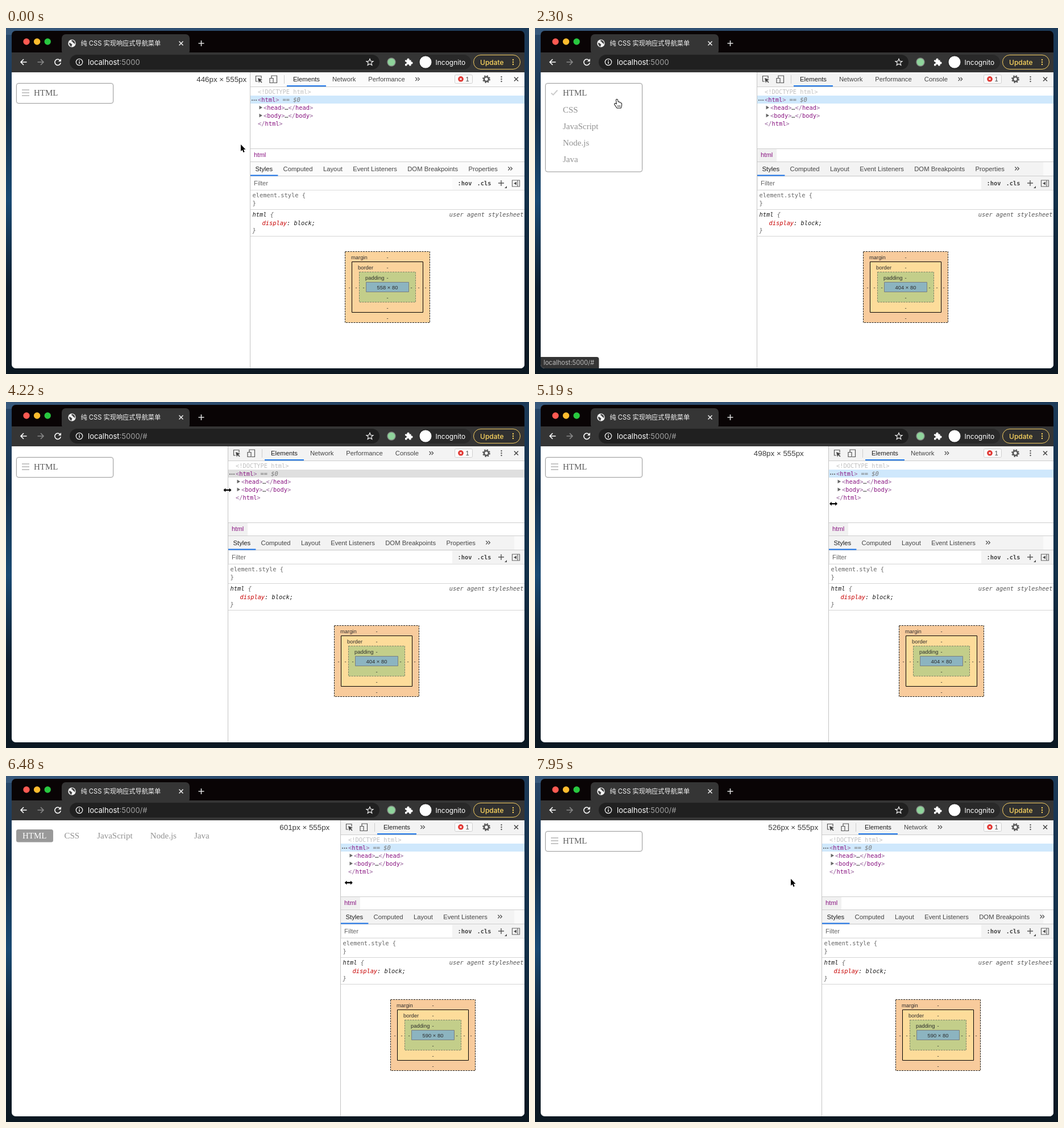
Recreate the animation shown at these times as an HTML page with a canvas. Size 920x609 px, loop 8000 ms.

```html
<!DOCTYPE html>
<html lang="zh-CN">
<head>
<meta charset="utf-8">
<style>
html, body { margin: 0; width: 100%; height: 100%; overflow: hidden; background: #0b1826; }
canvas { display: block; }
</style>
</head>
<body>
<canvas id="stage" width="920" height="609"></canvas>
<script>
const ctx = document.getElementById('stage').getContext('2d');
const LOOP = 8000, RIGHT = 912, SCALE = 0.94;
const CLICK = 2900, GRAB = 4690, SETTLED = 300;

const UI = 'Inter, "Noto Sans CJK SC", "Noto Sans CJK", sans-serif';
const SANS = '"Liberation Sans", sans-serif';
const MONO = '10.35px "DejaVu Sans Mono", monospace';
const SERIF = '15px "Liberation Serif", serif';
const TAB = '11.28px ' + SANS, SMALL = '9.4px ' + SANS;

// ---- motion ----
// Divider drags: begin, end, x, y, and how late the page layout follows the hand.
const drags = [
  [350, 800, 388.3, 205, 43],
  [930, 1120, 390.3, 205, 43],
  [4690, 5255, 530, 180, 167],
  [5530, 6230, 565, 187, 60],
  [6335, 6543, 613, 188, 83],
  [6750, 7080, 606, 187, 83],
  [7250, 7600, 504.5, 187, 83]
];
// Free pointer moves: begin, end, x, y.
const glides = [
  [60, 300, 429.5, 205],
  [1200, 1730, 160, 122],
  [1790, 2120, 146, 133],
  [2300, 2650, 152, 190],
  [2820, 3590, 215, 142],
  [3650, 4200, 389.5, 155],
  [7760, 7940, 450, 181]
];
const pointerMoves = [...drags, ...glides].sort((a, b) => a[0] - b[0]);
const DIVIDER_LAG = 43;

const ease = u => u * u * (3 - 2 * u);
const between = (t, a, b) => t >= a && t < b;

function follow(moves, t, start, lag = () => 0) {
  return moves.reduce((pos, m) => {
    const u = Math.min(1, Math.max(0, (t - lag(m) - m[0]) / (m[1] - m[0])));
    return pos.map((v, i) => v + (m[i + 2] - v) * ease(u));
  }, start);
}
// The box model only refreshes when the drag rests.
const boxWidth = t => t < 780 ? 558 : t < 1500 ? 402 : t < 6250 ? 404 : 590;

// ---- drawing helpers ----
function text(str, x, y, color, font, align = 'left') {
  ctx.font = font;
  ctx.fillStyle = color;
  ctx.textAlign = align;
  ctx.fillText(str, x, y);
  return x + ctx.measureText(str).width;
}
function rect(x, y, w, h, color) {
  ctx.fillStyle = color;
  ctx.fillRect(x, y, w, h);
}
function rounded(x, y, w, h, r, fill, stroke) {
  ctx.beginPath();
  ctx.roundRect(x, y, w, h, r);
  if (fill) { ctx.fillStyle = fill; ctx.fill(); }
  if (stroke) { ctx.strokeStyle = stroke; ctx.lineWidth = 1; ctx.stroke(); }
}
function dot(x, y, r, color) {
  ctx.beginPath();
  ctx.arc(x, y, r, 0, 7);
  ctx.fillStyle = color;
  ctx.fill();
}
function ring(x, y, r, color, width, dash = []) {
  ctx.beginPath();
  ctx.arc(x, y, r, 0, 2 * Math.PI);
  ctx.strokeStyle = color;
  ctx.lineWidth = width;
  ctx.setLineDash(dash);
  ctx.stroke();
  ctx.setLineDash([]);
}
function icon(path, x, y, color, width) {
  const shape = new Path2D(path);
  ctx.save();
  ctx.translate(x, y);
  if (width) { ctx.strokeStyle = color; ctx.lineWidth = width; ctx.stroke(shape); }
  else { ctx.fillStyle = color; ctx.fill(shape); }
  ctx.restore();
}
function gradient(x, y, w, h, horizontal, ...colors) {
  const g = horizontal ? ctx.createLinearGradient(x, 0, x + w, 0) : ctx.createLinearGradient(0, y, 0, y + h);
  colors.forEach((c, i) => g.addColorStop(i / (colors.length - 1), c));
  rect(x, y, w, h, g);
}
const CROSS = 'M-3.5-3.5L3.5 3.5M3.5-3.5L-3.5 3.5';
const PLUS = 'M-5 0H5M0-5V5';
const MORE = 'M-4-3L-1 0L-4 3M0-3L3 0L0 3';
const menuDots = (x, y, color) => [-4, 0, 4].forEach(dy => dot(x, y + dy, 1.2, color));

// ---- desktop and browser frame ----
function drawDesktop() {
  gradient(0, 0, 460, 609, false, '#28486a', '#17334f', '#1a4a73', '#0e1f30', '#0b1822');
  gradient(460, 0, 460, 609, false, '#1c3a58', '#163350', '#123049', '#0e1f30', '#0b1822');
  gradient(0, 0, 920, 12, true, '#38597c', '#2a4a6c', '#1c3a58');
}
function drawFrame(clicked) {
  rect(10, 5, 902, 38, '#090405');
  rect(10, 43, 902, 35, '#353535');
  ['#ff5a52', '#fdbc2e', '#28c840'].forEach((c, i) => dot(36 + i * 18.6, 24, 5.7, c));
  rounded(98, 11, 225, 36, 7, '#353535');
  dot(116, 27, 6.7, '#f4f4f4');
  icon('M-5-1Q-2-1-1 1Q1 1 0 3L-1 6Q-5 4-5-1ZM0-6Q-2-3 1-3Q1-1 4 0L5 2Q7-4 0-6Z', 116, 27, '#444');
  text('纯 CSS 实现响应式导航菜单', 131.5, 31, '#f6f6f6', '11.2px ' + UI);
  icon(CROSS, 308, 27, '#eee', 1.5);
  icon(PLUS, 343.5, 27, '#ddd', 1.6);

  icon('M5.5 0H-5M0-5L-5 0L0 5', 31, 60, '#fff', 1.6);
  icon('M-5.5 0H5M0-5L5 0L0 5', 61, 60, '#888', 1.6);
  icon('M4.3-2.8A5.2 5.2 0 1 0 5.2 1', 91, 60, '#fff', 1.6);
  icon('M6-6V-1H1Z', 91, 60, '#fff');
  rounded(112, 47, 545, 26, 13, '#202020');
  ring(129, 60, 5.7, '#eee', 1.3);
  rect(128.3, 59, 1.5, 4, '#eee');
  rect(128.3, 56.6, 1.5, 1.5, '#eee');
  const end = text('localhost', 144, 64.5, '#fff', '13px ' + UI);
  text(':5000' + (clicked ? '/#' : ''), end, 64.5, '#a2a2a2', '13px ' + UI);
  icon('M0-6L1.7-2L6-1.8L2.7 1L3.8 5.2L0 2.9L-3.8 5.2L-2.7 1L-6-1.8L-1.7-2Z', 640, 60.3, '#eee', 1.2);
  dot(678, 60, 7.7, '#858b86');
  dot(678, 60, 6.3, '#8fd49b');
  icon('M-6-3.5H-2.5A2.2 2.2 0 1 1 1.5-3.5H4.5V-.5A2.2 2.2 0 1 1 4.5 3.5V6.5H1.2A2 2 0 1 0-2.6 6.5H-6V3A2 2 0 1 0-6-.7Z',
    708, 60, '#fff');
  rounded(726, 47, 92, 26, 13, '#292929');
  dot(738, 60, 10.5, '#fff');
  text('Incognito', 755.5, 64.5, '#fff', '12px ' + UI);
  rounded(822.5, 47.5, 82, 25, 12.5, '#303030', '#f5cd62');
  text('Update', 834, 64.5, '#fcd55f', '500 12px ' + UI);
  menuDots(892, 60, '#fcd55f');
}

// ---- page with the responsive menu ----
const ITEMS = ['HTML', 'CSS', 'JavaScript', 'Node.js', 'Java'];

function drawMenu(pageWidth, open, hover) {
  if (pageWidth >= 600) {
    rounded(18, 94, 65, 22.5, 3.5, '#999');
    ITEMS.reduce((x, item, i) => 31 + text(item, x, 110, i ? '#929292' : '#fff', SERIF), 29);
    return;
  }
  const height = open ? 155.5 : 35;
  ctx.save();
  ctx.shadowColor = 'rgba(0,0,0,.3)';
  ctx.shadowBlur = 2;
  rounded(18.5, 97.5, 170, height, 3.5, '#fff');
  ctx.restore();
  rounded(18.5, 97.5, 170, height, 3.5, '#fff', '#a0a0a0');
  if (!open) {
    icon('M-6.5-5H6.5M-6.5 0H6.5M-6.5 5H6.5', 34.5, 114, '#b4b4b4', 1.3);
    text(ITEMS[0], 49, 119.3, '#5c5c5c', SERIF);
    return;
  }
  icon('M-5.5 1L-2 4.2L5.5-4', 34, 113.5, '#ccc', 2);
  ITEMS.forEach((item, i) => text(item, 49, 119.3 + i * 29.2, i === hover ? '#5c5c5c' : '#929292', SERIF));
}

// ---- developer tools; x = 0 is the divider ----
const PANELS = ['Elements', 'Network', 'Performance', 'Console', 'Sources'];
const SIDEBAR = ['Styles', 'Computed', 'Layout', 'Event Listeners', 'DOM Breakpoints', 'Properties', 'Accessibility'];

// Tabs that do not fit before `room` collapse into the chevron.
function tabs(names, x, y, gap, room, reserve) {
  ctx.font = TAB;
  let end = x;
  for (const [i, name] of names.entries()) {
    const left = i ? end + gap : x, right = left + ctx.measureText(name).width;
    if (i && right + 22.5 + reserve > room) break;
    text(name, left, y, i ? '#444' : '#1c1c1c', TAB);
    if (!i) rect(left - gap / 2, y + 7, right - left + gap, 2, '#1a73e8');
    end = right;
  }
  icon(MORE, end + 22.5, y - 4, '#555', 1.3);
}
// Segments are [string, colour, style?] written one after another.
function code(x, y, ...segments) {
  for (const [str, color, style = ''] of segments) x = text(str, x, y, color, style + ' ' + MONO);
}
const tag = (name, slash = '') => [['<' + slash, '#96609a'], [name, '#881280'], ['>', '#96609a']];

function drawBoxModel(c, width, settled) {
  const layers = [
    ['margin', settled ? '#f8cb9c' : '#fbd39c', '#222', [3, 1.5]],
    ['border', settled ? '#fddc9a' : '#fbd39c', '#000', []],
    ['padding', '#c3ce8a', '#7f8468', [3, 1.5]],
    ['', '#8cb4c0', '#7a7f80', []]
  ];
  const label = (str, x, y, align = 'center') => text(str, x, y, '#2c2c2c', SMALL, align);
  layers.forEach(([name, fill, stroke, dash], i) => {
    const half = 74.5 - Math.round(i * 12.33), inset = i * 18;
    ctx.setLineDash(dash);
    rounded(c - half, 393.5 + inset, half * 2, 125 - inset * 2, 0, fill, stroke);
    ctx.setLineDash([]);
    if (!name) return label(width + ' × 80', c, 460);
    label(name, c - half + 10.5, 406.5 + inset, 'left');
    label('-', c, 406.5 + inset);
    label('-', c, 514 - inset);
    label('-', c - half + 7.5, 460);
    label('-', c + half - 7.5, 460);
  });
}

function drawTools(divider, t) {
  const x0 = Math.floor(divider), width = RIGHT - x0, at = x => x - x0;
  const settled = t >= SETTLED, edge = '#cdcdcd', bar = settled ? '#f3f3f3' : '#fbfbfb';
  ctx.save();
  ctx.translate(x0, 0);
  rect(0, 78, width, 521, '#fff');

  // panel toolbar
  rect(0, 78, width, 25, bar);
  rect(0, 103, width, 1, edge);
  icon('M4-1V-5.5H-5.5V4H-2', 16, 90, '#555', 1.2);
  icon('M-2-2L6 1L2.6 2.4L5.6 5.4L4.4 6.6L1.4 3.6L0 7Z', 16, 90, '#444');
  icon('M-3-2V-6.5H6.5V6H1M-6-2H0V6H-6Z', 41, 90.5, '#555', 1.2);
  rect(60, 83, 1, 15, '#ccc');
  tabs(PANELS, 76, 94, 22, 789 - divider, 10.5);
  rounded(at(789.5), 82.5, 31, 15, 2, '#fafafa', '#d0d0d0');
  dot(at(800), 89.8, 4.8, '#e0302b');
  icon('M-1.7-1.7L1.7 1.7M1.7-1.7L-1.7 1.7', at(800), 89.8, '#fff', 1.1);
  text('1', at(808.5), 94, '#444', TAB);
  ring(at(845), 90, 4, '#555', 2.6);
  ring(at(845), 90, 6, '#555', 1.8, [2.4, 2.31]);
  menuDots(at(871.5), 90, '#555');
  icon(CROSS, at(897.5), 90, '#444', 1.5);

  // element tree
  rect(1, 119, width, 14, between(t, CLICK, GRAB) ? '#dfdfdf' : '#cfe8fc');
  code(14, 115.5, ['<!DOCTYPE html>', '#c0c0c0']);
  [4, 7.5, 11].forEach(x => dot(x, 127, 1, '#555'));
  code(14, 129.5, ...tag('html'), [' == ', '#777'], ['$0', '#777', 'italic']);
  ['head', 'body'].forEach((name, i) => {
    icon('M-2.5-3.3L3 0L-2.5 3.3Z', 19, 140 + i * 14, '#666');
    code(24, 143.5 + i * 14, ...tag(name), ['…', '#333'], ...tag(name, '/'));
  });
  code(14, 171.5, ...tag('html', '/'));

  // breadcrumb, style tabs and filter
  rect(0, 212, width, 1, edge);
  if (settled) rect(1, 213, 34, 22, '#f1f1f1');
  text('html', 7, 227, '#881280', TAB);
  rect(0, 235, width, 51, bar);
  if (settled) rect(at(894), 236, 18, 24, '#fafafa');
  rect(0, 235, width, 1, edge);
  rect(0, 260, width, 1, edge);
  tabs(SIDEBAR, 9.5, 251.5, 18.4, RIGHT - divider, 14.5);
  rect(3, 262, at(785) - 3, 22, '#fff');
  rect(0, 285, width, 1, '#dedede');
  text('Filter', 7, 277, '#666', TAB);
  text(':hov', at(794.5), 276.5, '#444', 'bold ' + MONO);
  text('.cls', at(828.5), 276.5, '#444', 'bold ' + MONO);
  icon(PLUS, at(871), 273, '#555', 1.4);
  icon('M2 2V-2L-2 2Z', at(879), 280, '#555');
  icon('M-6.5-5.5H6.5V5.5H-6.5ZM3-5.5V5.5', at(897), 273.5, '#666', 1.2);
  icon('M1-3V3L-4 0Z', at(897), 273.5, '#555');

  // rules
  code(4.5, 297.5, ['element.style {', '#666']);
  code(4.5, 312, ['}', '#666']);
  rect(0, 319, width, 1, '#d5d5d5');
  code(4.5, 331.5, ['html', '#1c1c1c', 'italic'], [' {', '#666', 'italic']);
  text('user agent stylesheet', at(910.5), 331.5, '#555', 'italic ' + MONO, 'right');
  code(21.5, 346.5, ['display', '#c80000', 'italic'], [': block;', '#1c1c1c', 'italic']);
  code(4.5, 359.5, ['}', '#666', 'italic']);
  rect(0, 366, width, 1, '#d5d5d5');

  drawBoxModel(Math.ceil((width + 1) / 2), boxWidth(t), settled);
  rect(0, 78, 1, 521, '#c4c4c4');
  ctx.restore();
}

// ---- pointer ----
const CURSORS = {
  arrow: 'M0 0V12L2.7 9.4L4.6 14L6.7 13.1L4.8 8.7H8.5Z',
  resize: 'M-7 0L-3.3-3.6V-1.2H3.3V-3.6L7 0L3.3 3.6V1.2H-3.3V3.6Z',
  hand: 'M-3-6.5Q-2-8-1-6.5L0-2.4Q1.4-3.5 2.2-1.8Q3.8-2.6 4.4-.8Q6-1.2 6.2.8L6 4L4.8 7.5H-1.6L-5.6 1.8Q-6.3 0-4.6 0L-2 1.6Z'
};
function drawCursor(kind, x, y) {
  const isHand = kind === 'hand';
  icon(CURSORS[kind], x, y, isHand ? '#111' : '#fff', isHand ? 2 : 1.8);
  icon(CURSORS[kind], x, y, isHand ? '#fff' : '#000');
  if (isHand) icon('M-.4 3V6M1.6 3V6M3.6 3V6', x, y, '#222', .8);
}

function draw(t) {
  const [x, y] = follow(pointerMoves, t, [413, 205]);
  const [divider] = follow(drags, t, [429.5], () => DIVIDER_LAG);
  const [page] = follow(drags, t, [429.5], drag => drag[4]);
  const pageWidth = Math.floor((page - 10) / SCALE);
  const open = x < 188;
  const dragging = drags.some(d => between(t, d[0], d[1] + DIVIDER_LAG));

  drawDesktop();
  ctx.save();
  ctx.beginPath();
  ctx.roundRect(10, 5, 902, 594, 7);
  ctx.clip();
  rect(10, 78, 902, 521, '#fff');
  drawFrame(t >= CLICK);
  drawMenu(pageWidth, open, Math.floor((y - 108) / 29.2));
  if (!between(t, 1900, GRAB)) text(`${pageWidth}px × 555px`, page - 6.3, 95, '#3c3c3c', '13.35px ' + SANS, 'right');
  if (between(t, 1850, 3750)) {
    rounded(10, 579, 102.5, 20, [0, 4, 0, 0], '#353535');
    text('localhost:5000/#', 15, 593, '#bdbdbd', '11.1px ' + UI);
  }
  drawTools(divider, t);
  ctx.restore();
  drawCursor(open ? 'hand' : dragging || Math.abs(x - divider) < 5 ? 'resize' : 'arrow', x, y);
}

function loop() {
  draw(performance.now() % LOOP);
  requestAnimationFrame(loop);
}
loop();
</script>
</body>
</html>
```
